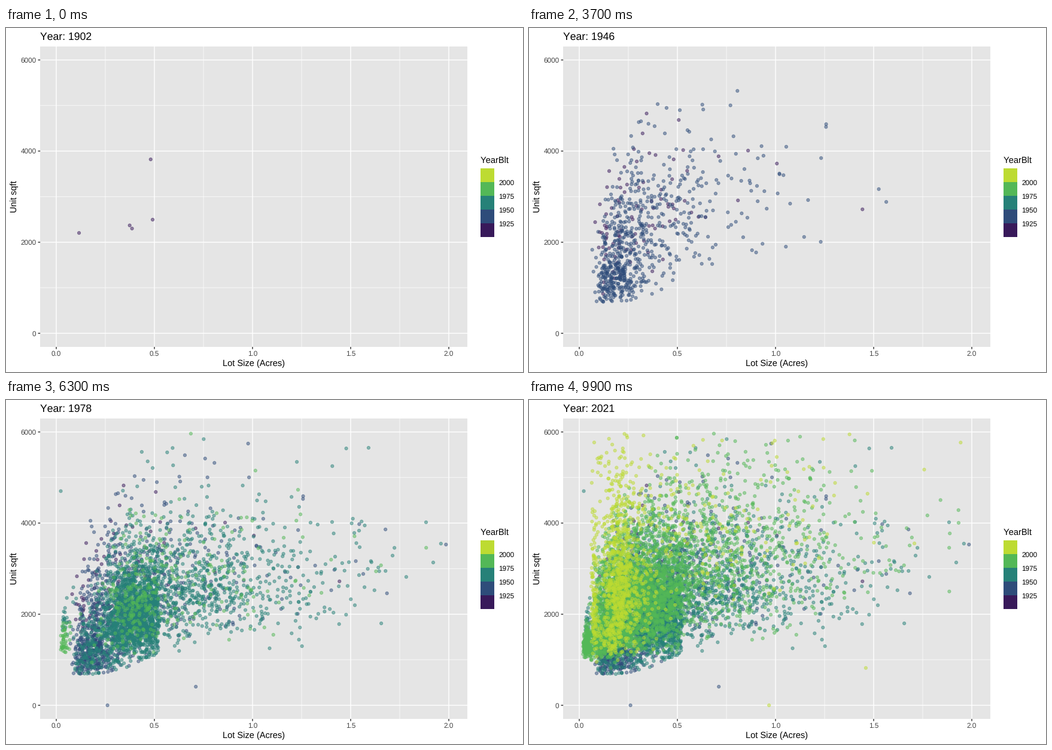
Recreate the animation shown at these times as a matplotlib script. Size 864 by 576 pixels, loop 10000 ms.

```python
import numpy as np
import matplotlib.pyplot as plt
from matplotlib.animation import FuncAnimation
from matplotlib.patches import Rectangle

W, H = 864, 576
LEFT, RIGHT, TOP, BOTTOM = 57.2, 771, 30.6, 534
FRAMES, FIRST, LAST = 100, 1902, 2021
BREAKS = [1925, 1950, 1975, 2000]
COLORS = ["#38195a", "#2e4c7a", "#268178", "#53b857", "#bddb32"]

plt.rcParams.update({
    "font.family": "Liberation Sans",
    "text.kerning_factor": 6,  # practically no kerning
    "text.hinting": "no_hinting",
})
rng = np.random.default_rng(12)


def px(lot):
    return 84 + 328 * np.asarray(lot)


def py(sqft):
    return 511.2 - 0.07628 * np.asarray(sqft)


def step(year, mid, width):
    """Smooth rise from 0 to 1 around a year."""
    return 1 / (1 + np.exp((mid - year) / width))


def plausible(year, lot, sqft):
    """Limits of lot and floor area in each period."""
    small_ok = (year > 1968) & (year < 2000)
    roof = np.interp(lot, [0.02, 0.08, 0.2, 0.5], [1500, 3400, 4500, 6000])
    roof = np.where(year > 2000, 5970, roof)
    floor = np.interp(lot, [0.05, 0.3, 0.5, 1], [1000, 680, 1080, 1200])
    floor = np.where((lot > 0.08) & (lot < 0.3), 680, floor)
    return ((year > FIRST) & (year <= LAST) & (lot < 2)
            & (lot > np.where(small_ok, 0.019, 0.06))
            & (sqft > floor) & (sqft < roof))


def homes(n, built, spread, lot, sqft, s_lot, s_sqft, rho=0.0, max_lot=2):
    """Log-normal lots and floor areas; sqft may depend on the year."""
    year = np.rint(rng.normal(built, spread, 4 * n))
    a, b = rng.standard_normal((2, 4 * n))
    lots = lot * np.exp(s_lot * a)
    mid = sqft(year) if callable(sqft) else sqft
    area = mid * np.exp(s_sqft * (rho * a + np.sqrt(1 - rho**2) * b))
    ok = plausible(year, lots, area) & (lots < max_lot)
    return np.column_stack([year, lots, area])[ok][:n]


# Year, lot, floor area of the opening houses and the clear strays
KEY_HOMES = [
    (1902, 0.116, 2203), (1902, 0.374, 2369), (1902, 0.386, 2300),
    (1902, 0.491, 2495), (1902, 0.481, 3818),
    (1950, 0.261, 0), (1948, 0.711, 409), (1965, 0.023, 4702),
    (2004, 0.967, 0), (2005, 1.46, 820),
]

data = np.vstack([
    KEY_HOMES,
    # old town houses and villas
    homes(780, 1944, 12, 0.20, lambda y: 2650 - 1450 * step(y, 1930, 4),
          0.36, 0.38, 0.4),
    homes(300, 1938, 11, 0.38, 2800, 0.5, 0.32, 0.4),
    # post-war suburbs, up to half an acre
    homes(1800, 1969, 9, 0.42, lambda y: 1750 + 25 * (y - 1957),
          0.24, 0.26, 0.1, max_lot=0.52),
    # large lots, with houses that grow over time
    homes(2150, 1976, 17, 0.68, lambda y: 2500 + 1400 * step(y, 1984, 4),
          0.42, 0.27, 0.2),
    # condos
    homes(300, 1983, 7, 0.04, lambda y: 1970 - 630 * step(y, 1976, 0.5),
          0.3, 0.12),
    # subdivisions of the nineties
    homes(650, 1991, 5, 0.16, lambda y: 1450 + 20 * (y - 1986),
          0.5, 0.18, 0.4),
    homes(1950, 1994, 4, 0.25, 2500, 0.48, 0.27, 0.2, max_lot=0.6),
    # recent building on small lots
    homes(640, 2010, 5, 0.21, 2750, 0.25, 0.28, 0.1),
    homes(120, 2011, 4, 0.078, 2450, 0.12, 0.38),
    homes(150, 2011, 4, 0.24, 4500, 0.45, 0.18),
    homes(90, 2008, 4, 0.17, 1450, 0.25, 0.13),
])
data = data[np.argsort(data[:, 0], kind="stable")]
years = data[:, 0]
spots = np.column_stack([px(data[:, 1]), py(data[:, 2])])
palette = np.array(COLORS)[np.searchsorted(BREAKS, years)]

fig = plt.figure(figsize=(W / 72, H / 72), dpi=72, facecolor="white")
ax = fig.add_axes([0, 0, 1, 1])
ax.set_xlim(0, W)
ax.set_ylim(H, 0)
ax.axis("off")


def line(x, y, color, lw, z):
    ax.plot(x, y, color=color, lw=lw, zorder=z, snap=False,
            solid_capstyle="butt")


def label(x, y, text, size, color="black", **kw):
    return ax.text(x, y, text, fontsize=size, color=color,
                   va="baseline", **kw)


ax.add_patch(Rectangle((LEFT, TOP), RIGHT - LEFT, BOTTOM - TOP,
                       fc="#e5e5e5", ec="none", zorder=0))
for lot in np.arange(0.25, 2, 0.5):
    line([px(lot)] * 2, [TOP, BOTTOM], "white", 0.71, 1)
for sqft in (1000, 3000, 5000):
    line([LEFT, RIGHT], [py(sqft)] * 2, "white", 0.71, 1)
for lot in np.arange(0, 2.1, 0.5):
    x = px(lot)
    line([x, x], [TOP, BOTTOM], "white", 1.42, 2)
    line([x, x], [BOTTOM, BOTTOM + 3.67], "#2b2b2b", 1.42, 2)
    label(x, 549.2, f"{lot:.1f}", 11.73, "#444444", ha="center")
for sqft in (0, 2000, 4000, 6000):
    y = py(sqft)
    line([LEFT, RIGHT], [y, y], "white", 1.42, 2)
    line([LEFT - 3.67, LEFT], [y, y], "#2b2b2b", 1.42, 2)
    label(50.5, y + 4.2, str(sqft), 11.73, "#444444", ha="right")

label(414, 566, "Lot Size (Acres)", 14.67, ha="center")
label(18, 282.5, "Unit sqft", 14.67, ha="center", rotation=90,
      rotation_mode="anchor")
title = label(57, 20, "", 17.6)

label(792.8, 227, "YearBlt", 14.67)
for i, color in enumerate(reversed(COLORS)):
    ax.add_patch(Rectangle((793, 235 + 23.04 * i), 23.04, 23.04,
                           fc=color, ec="none"))
for i, year in enumerate(reversed(BREAKS)):
    label(823, 262.9 + 23.04 * i, str(year), 11.73)

dots = ax.scatter([], [], s=5.2**2, linewidths=0.95, alpha=0.5, zorder=3)


def update(i):
    year = FIRST + round((LAST - FIRST) * i / (FRAMES - 1))
    n = np.searchsorted(years, year, side="right")
    dots.set_offsets(spots[:n])
    dots.set_facecolor(palette[:n])
    dots.set_edgecolor(palette[:n])
    title.set_text(f"Year: {year}")
    return dots, title


anim = FuncAnimation(fig, update, frames=FRAMES, interval=100,
                     repeat=True, repeat_delay=0)
plt.show()
```
